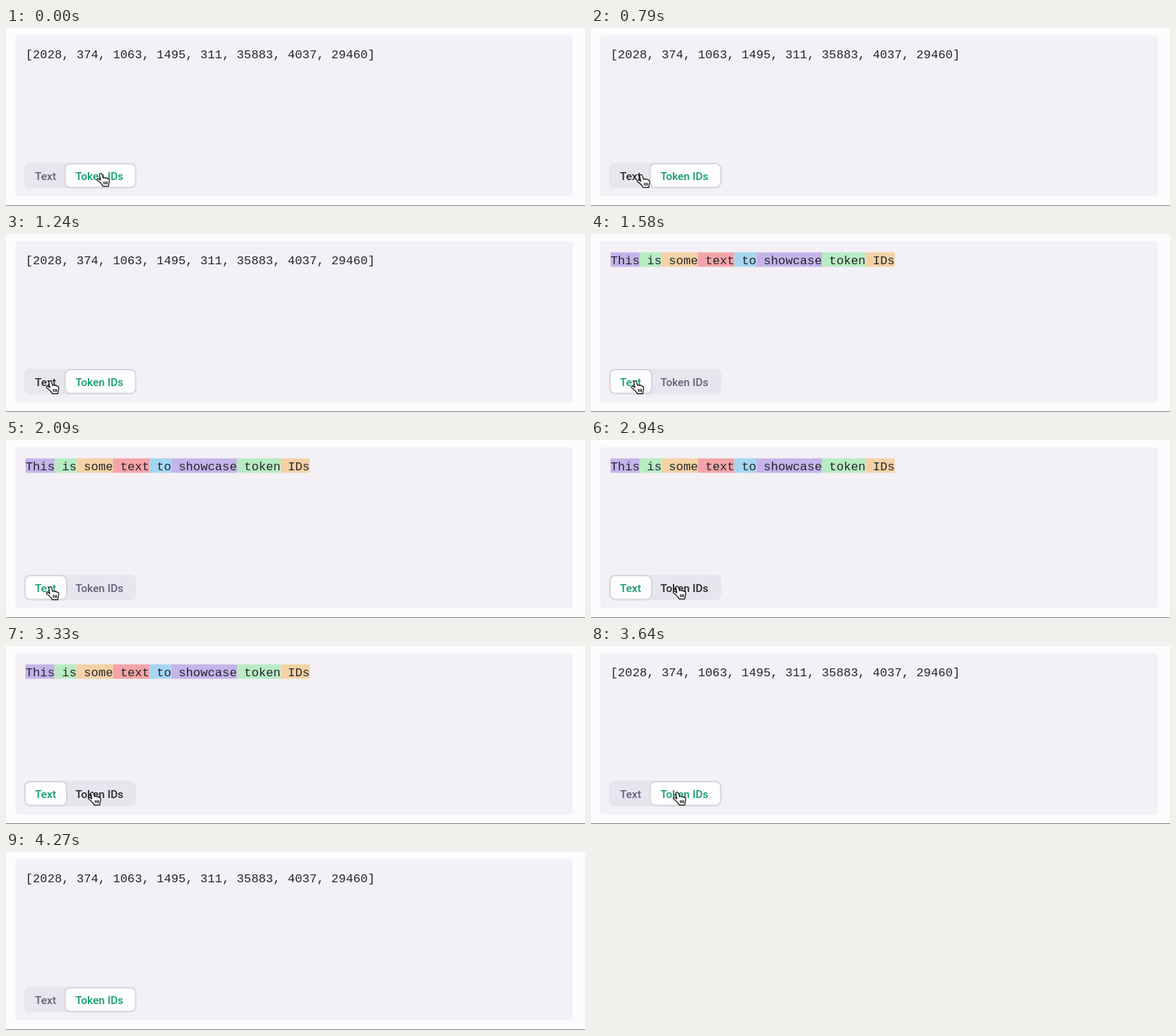
These frames come from a looping animation (800 by 247 pixels, 4.3 s). An HTML page:

```html
<!DOCTYPE html>
<html lang="en">
<head>
<meta charset="utf-8">
<style>
html, body { margin: 0; width: 800px; height: 247px; overflow: hidden; background: #fdfbfe; }
svg { display: block; }
.mono { font: 16.78px "Liberation Mono", monospace; fill: #26262b; white-space: pre; }
.label { font: 500 15.1px Roboto, sans-serif; }
#pill { fill: #fdfcfe; filter: drop-shadow(0 0 1.5px #0004); }
</style>
</head>
<body>
<svg width="800" height="247" viewBox="0 0 800 247">
  <rect x="13" y="10" width="770" height="223.5" rx="4" fill="#f3f1f5"/>
  <rect y="246" width="800" height="1" fill="#858387"/>
  <text id="ids" class="mono" x="27" y="42">[2028, 374, 1063, 1495, 311, 35883, 4037, 29460]</text>
  <g id="words"></g>
  <rect x="25" y="187" width="155" height="35.5" rx="8" fill="#e7e5ee"/>
  <rect id="pill" y="189" height="31.5" rx="6.5"/>
  <text id="textLabel" class="label" x="40" y="211">Text</text>
  <text id="idsLabel" class="label" x="96" y="211">Token IDs</text>
  <g id="hand" stroke="#111" stroke-width="1.2" stroke-linejoin="round">
    <path fill="#fff" d="M-1.8 1.5Q-1.5-.6 .3-.2Q1.6 0 2 1.6L3.4 6.4Q4 5.2 5.4 5.6Q6.4 5.9 6.6 6.6Q7.6 5.6 8.8 6.2Q9.6 6.7 9.7 7.5Q11.2 7 11.7 8.6Q12.2 11 11.2 13.5L10.6 17.6H2.8Q2.4 16 .4 14Q-1.5 11.5-4.8 9.6Q-6 8-4.4 7.2Q-2.6 6.8-.4 9.2Z"/>
    <path fill="none" d="M4.5 11v4M6.7 11v4M8.8 11v4"/>
  </g>
</svg>
<script>
const LOOP = 4300, ADVANCE = 10.07;
const SHOW_TEXT = 1440, SHOW_IDS = 3510;
const $ = id => document.getElementById(id);
const colors = ["#c4b4ea", "#b8ebc4", "#f4d2a6", "#f4a4a9", "#a4d6f2"];

let column = 0;
$("words").innerHTML = ["This", " is", " some", " text", " to", " showcase", " token", " IDs"].map((word, i) => {
  const x = 27 + column * ADVANCE;
  column += word.length;
  return `<rect x="${x}" y="25.5" width="${word.length * ADVANCE}" height="20" fill="${colors[i % 5]}"/>` +
    `<text class="mono" x="${x}" y="42">${word}</text>`;
}).join("");

// Each move: start, end, from point, to point
const moves = [
  [270, 932, 131, 202, 61, 204],
  [2200, 2790, 61, 204, 119, 203],
  [3870, 4030, 119, 203, 123, 204],
  [4030, 4260, 123, 204, 10, 252]
];

function cursorAt(t) {
  const [start, end, x0, y0, x1, y1] = moves.filter(m => t >= m[0]).pop() || moves[0];
  const u = Math.min(1, Math.max(0, (t - start) / (end - start)));
  const k = u * u * (3 - 2 * u);
  return [x0 + (x1 - x0) * k, y0 + (y1 - y0) * k];
}

function draw(now) {
  const t = now % LOOP;
  const [x, y] = cursorAt(t);
  const textMode = t >= SHOW_TEXT && t < SHOW_IDS;
  const inside = y >= 187 && y < 222;
  const color = (active, hover) => active ? "#109c69" : hover ? "#26262b" : "#62607a";

  $("words").style.display = textMode ? "" : "none";
  $("ids").style.display = textMode ? "none" : "";
  $("pill").setAttribute("x", textMode ? 27 : 82.5);
  $("pill").setAttribute("width", textMode ? 56 : 96);
  $("textLabel").setAttribute("fill", color(textMode, inside && x >= 25 && x < 83));
  $("idsLabel").setAttribute("fill", color(!textMode, inside && x >= 83 && x < 180));
  $("hand").setAttribute("transform", `translate(${x} ${y})`);
  requestAnimationFrame(draw);
}
draw(performance.now());
</script>
</body>
</html>
```
